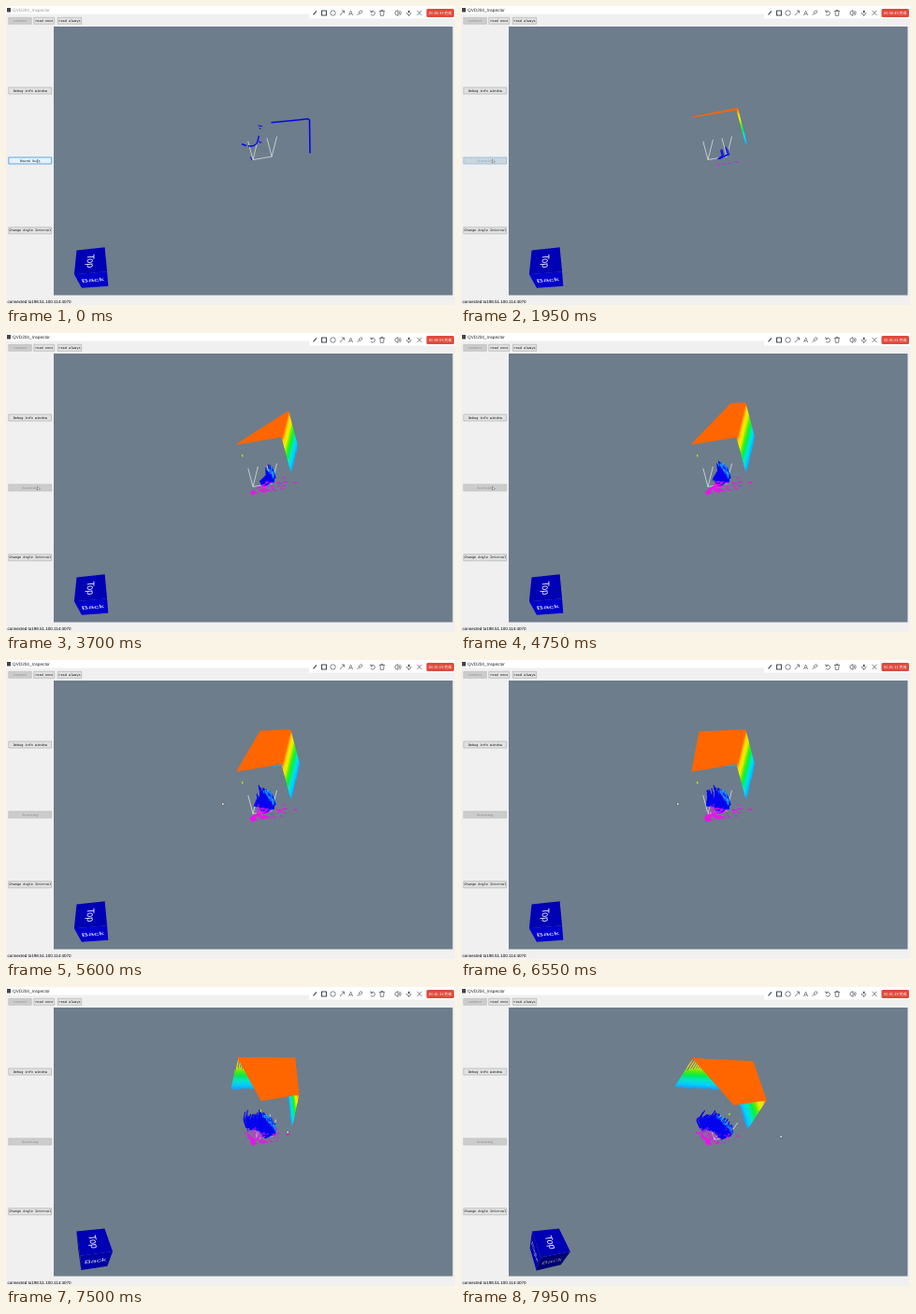
These frames come from a looping animation (480 by 320 pixels, 8000 ms). An HTML page with a canvas:

```html
<!DOCTYPE html>
<html lang="en">
<head>
<meta charset="utf-8">
<title>Range scan</title>
<style>
html, body { margin: 0; width: 480px; height: 320px; overflow: hidden; background: #f0f0f0; }
canvas { display: block; }
</style>
</head>
<body>
<canvas id="stage" width="480" height="320"></canvas>
<script>
const ctx = document.getElementById('stage').getContext('2d');
const LOOP = 8000, SCAN_START = 1800, TURN_START = 6900, TURN_TIME = 1050;
const RAD = Math.PI / 180;
const SCAN_RATE = 0.0196 * RAD, SCAN_STEP = 0.8 * RAD;
const MONO = '3.55px "Liberation Mono", monospace';
const SANS = '"Liberation Sans", Arial, sans-serif';
const BLUE = '#0606ee', ORANGE = '#ff6600', MAGENTA = '#f010f0';

const mix = (a, b, k) => a + (b - a) * k;
const clamp = v => Math.min(1, Math.max(0, v));
const turnAt = t => clamp((t - TURN_START) / TURN_TIME);

function random(seed) {
  return () => (seed = (seed * 16807) % 2147483647) / 2147483647;
}

function rect(x, y, w, h, fill) {
  ctx.fillStyle = fill;
  ctx.fillRect(x, y, w, h);
}

function trace(points, closed) {
  ctx.beginPath();
  for (const [x, y] of points) ctx.lineTo(x, y);
  if (closed) ctx.closePath();
}

function line(points, color, width = 1) {
  trace(points);
  ctx.strokeStyle = color;
  ctx.lineWidth = width;
  ctx.stroke();
}

function polygon(points, fill, edge, width = 0.8) {
  trace(points, true);
  ctx.fillStyle = fill;
  ctx.fill();
  if (edge) {
    ctx.strokeStyle = edge;
    ctx.lineWidth = width;
    ctx.stroke();
  }
}

function arc(x, y, r, color, from = 0, to = 2 * Math.PI) {
  ctx.beginPath();
  ctx.arc(x, y, r, from, to);
  ctx.strokeStyle = color;
  ctx.lineWidth = 0.7;
  ctx.stroke();
}

function label(text, x, y, font, color = '#000', align = 'left') {
  ctx.font = font;
  ctx.fillStyle = color;
  ctx.textAlign = align;
  ctx.textBaseline = 'middle';
  ctx.fillText(text, x, y);
}

function button(text, x, y, w, state = 'normal') {
  const [fill, edge, color] = {
    normal: ['#e1e1e1', '#adadad', '#000'],
    disabled: ['#cccccc', '#bfbfbf', '#858585'],
    hover: ['#e5f1fb', '#0078d7', '#000'],
    leaving: ['#cbd6df', '#3c8fce', '#7f9fb8']
  }[state];
  rect(x, y, w, 7.6, fill);
  ctx.strokeStyle = edge;
  ctx.lineWidth = 0.6;
  if (state === 'leaving') ctx.setLineDash([1, 1]);
  ctx.strokeRect(x + 0.3, y + 0.3, w - 0.6, 7);
  ctx.setLineDash([]);
  label(text, x + w / 2, y + 4, MONO, color, 'center');
}

function toolbar(t) {
  const ink = '#484c55', stroke = (...points) => line(points, ink, 0.7);
  rect(324, 0, 156, 13.5, '#fff');
  line([[328.5, 9.4], [332, 5.4]], ink, 1.2);
  ctx.strokeRect(337.5, 5, 5, 5);
  ctx.lineWidth = 0.7;
  arc(349.5, 7.5, 2.7, ink);
  stroke([357, 10], [361.5, 5]);
  stroke([358.8, 5], [361.5, 5], [361.5, 7.8]);
  label('A', 368.5, 7.6, '7px ' + SANS, ink, 'center');
  stroke([375.5, 10], [378, 7.5]);
  polygon([[377, 7], [379.5, 4.5], [381, 6], [378.5, 8.5]], '#fff', ink, 0.7);
  arc(392, 7.7, 2.4, ink, -2.4, 2.6);
  stroke([389.8, 4.4], [390, 6.6], [392, 6.4]);
  stroke([399, 5.5], [405, 5.5]);
  stroke([401, 5], [401, 4.4], [403, 4.4], [403, 5]);
  stroke([400, 5.5], [400.3, 10.3], [403.7, 10.3], [404, 5.5]);
  polygon([[416, 6.3], [419, 4.6], [419, 10.4], [416, 8.7]], '#fff', ink, 0.7);
  for (const r of [1.6, 3.1]) arc(419, 7.5, r, ink, -1, 1);
  line([[430.7, 4.8], [430.7, 7.3]], ink, 1.8);
  arc(430.7, 7, 2.4, ink, 0, Math.PI);
  stroke([430.7, 9.4], [430.7, 11]);
  stroke([439.5, 4.8], [444.5, 10]);
  stroke([444.5, 4.8], [439.5, 10]);

  ctx.beginPath();
  ctx.roundRect(449.5, 3, 29.5, 9, 1.5);
  ctx.fillStyle = '#e04a3c';
  ctx.fill();
  const s = Math.floor(35 + t * 0.0055), two = n => String(n).padStart(2, '0');
  label(`00:${two(Math.floor(s / 60))}:${two(s % 60)} 完成`, 464.3, 7.6,
    '4px "Noto Sans CJK SC", "Noto Sans CJK JP", sans-serif', '#fff', 'center');
}

function panel(t) {
  rect(0, 0, 480, 320, '#f0f0f0');
  rect(0, 0, 480, 8.5, '#fff');
  rect(1, 2, 4, 4.5, '#444');
  label('QVD204_Inspector', 7, 4.3, '4.7px ' + SANS, t < SCAN_START ? '#999' : '#222');
  button('connect', 2.5, 12, 25, 'disabled');
  button('read once', 29.5, 12, 22.5);
  button('read always', 55, 12, 26);
  button('Debug info window', 2.5, 86.8, 46.5);
  if (t < SCAN_START) button('Round Scan', 2.5, 161.7, 46.5, 'hover');
  else button('Scanning', 2.5, 161.7, 46.5, t < 2600 ? 'leaving' : 'disabled');
  button('Change Angle Interval', 2.5, 236.5, 46.5);
  label('connected to198.51.100.114:4070', 1.5, 317, '4.5px ' + SANS);
  toolbar(t);
  rect(51, 22, 426.5, 287.5, '#6d7d8b');
}

// Room space: origin on the ceiling above the scanner, u to the side wall,
// v to the far wall, h downwards. The view turn blends the three screen axes.
function roomView(t) {
  const k = turnAt(t);
  const ox = mix(247, 292, k), oy = mix(119, 126, k * k);
  const ux = mix(48, 34, k), uy = mix(-8, -5, k);
  const vx = mix(9, -14, k), vy = mix(-36, -41, k);
  const hx = mix(10, -20, k), hy = mix(38, 31, k);
  return (u, v, h) => [ox + u * ux + v * vx + h * hx, oy + u * uy + v * vy + h * hy];
}

// Distance from the scanner to the walls: side wall at u = 1, slanted far wall behind it.
function wallDistance(a) {
  return Math.min(1 / Math.max(Math.cos(a), 0.01), 1.17 / (Math.sin(a) + 0.17 * Math.cos(a)));
}

function axes(at) {
  for (const u of [0.1, 0.52]) {
    const base = at(u, 0, 1.22);
    line([base, at(u, 0, 0.7)], '#d9dee2', 0.8);
    line([base, at(u, 0.6, 1.22)], '#d9dee2', 0.8);
  }
  line([at(0.1, 0, 1.22), at(0.52, 0, 1.22)], '#d9dee2', 0.8);
}

function liveProfile(t) {
  const rnd = random(Math.floor(t / 50) + 11), j = () => (rnd() - 0.5) * 0.5;
  line([[283.5, 125 + j()], [312, 122 + j()], [323, 120.8], [324.5, 122], [325, 157.5]], BLUE, 1.6);
  line([[252, 147.8 + j()], [257, 149.5]], BLUE, 1.6);
  line([[259, 150], [264, 150 + j()], [268, 147.5], [270.5, 139]], BLUE, 1.3);
  line([[269.5, 128], [274, 128.5 + j()]], BLUE);
  line([[271, 130], [272, 132]], BLUE);
  line([[270, 144], [271, 146], [273.5, 146]], BLUE);
  line([[261.5, 161.5], [263, 165]], BLUE);
}

function wallPaint([x0, y0], [x1, y1]) {
  const g = ctx.createLinearGradient(x0, y0, x1, y1);
  [ORANGE, '#ffd800', '#e8f000', '#58f000', '#00f050', '#00e8c8', '#00d0ff', '#10a0ff']
    .forEach((c, i) => g.addColorStop(i / 7, c));
  return g;
}

// One entry per scanner direction reached so far, each with its own fixed noise.
function sweep(t) {
  const rnd = random(4711), end = (t - SCAN_START) * SCAN_RATE, columns = [];
  for (let a = 0; a < end; a += SCAN_STEP)
    columns.push({ a, i: columns.length, n: [rnd(), rnd(), rnd(), rnd()] });
  return columns;
}

function scan(t, at) {
  const columns = sweep(t);
  const ray = (a, r, h) => at(r * Math.cos(a), r * Math.sin(a), h);
  const edge = columns.map(({ a }) => ray(a, wallDistance(a), 0));

  for (const { a, i, n } of [...columns].reverse()) {
    const r = wallDistance(a), top = ray(a, r, 0), foot = ray(a, r, 0.92 + 0.1 * n[0]);
    const sparse = a > 70 * RAD && i % 3;
    line([sparse ? ray(a, r, 0.3 + 0.1 * n[1]) : top, foot], wallPaint(top, ray(a, r, 1)), 1.1);
  }
  polygon([at(0, 0, 0), ...edge], ORANGE, ORANGE, 1.2);

  // Things near the scanner: blue fittings, cyan tops, magenta floor.
  for (const { a, n } of columns) {
    if (a > 70 * RAD && n[3] < 0.3) continue;
    const r = 0.42 + 0.18 * n[0];
    line([ray(a, 0.26 + 0.14 * n[1], 1.25), ray(a, r, 1.18), ray(a, r, 1.16 - 0.22 * n[2])], BLUE, 1.1);
  }
  for (const { a, n } of columns) {
    const r = n[1] * (a < 25 * RAD ? 0.75 : 0.38);
    line([ray(a, r, 1.33 + 0.1 * n[2]), ray(a, r + 0.07, 1.36 + 0.1 * n[2])], MAGENTA, 1);
    if (a < 60 * RAD && n[3] < 0.6)
      line([ray(a, 0.5 + 0.1 * n[2], 1.1), ray(a, 0.5 + 0.1 * n[2], 1 + 0.1 * n[0])], '#18b0ff', 0.8);
  }
  if (columns.length > 20) {
    line([at(0.05, 0, 0.3), at(0.05, 0, 0.37)], '#a8e800', 1.4);
    line([at(0.94, 0.12, 1.4), at(1.02, 0.12, 1.4)], MAGENTA, 1.4);
  }
}

// Perspective view of the orientation cube, looked at from 55 degrees above.
function cubeView(yaw, roll) {
  const s = Math.sin(55 * RAD), c = Math.cos(55 * RAD);
  return ([x, y, z]) => {
    const px = x * Math.cos(yaw) - y * Math.sin(yaw), py = x * Math.sin(yaw) + y * Math.cos(yaw);
    const up = py * s + z * c, scale = 118 / (8 + py * c - z * s);
    return [92.7 + scale * (px * Math.cos(roll) - up * Math.sin(roll)),
      281 - scale * (px * Math.sin(roll) + up * Math.cos(roll))];
  };
}

// Each face: name, normal, direction of its text, downward direction of its text.
const FACES = [
  ['Left', [1, 0, 0], [0, 1, 0], [0, 0, -1]],
  ['Right', [-1, 0, 0], [0, -1, 0], [0, 0, -1]],
  ['Back', [0, -1, 0], [1, 0, 0], [0, 0, -1]],
  ['Top', [0, 0, 1], [0, -1, 0], [-1, 0, 0]]
];

function cube(t) {
  const k = turnAt(t), yaw = mix(-12, 36, k) * RAD, roll = mix(15, -21, k) * RAD;
  const view = cubeView(yaw, roll), lamp = yaw + 20 * RAD;
  for (const [name, n, a, b] of FACES) {
    const corner = (i, j) => view(n.map((v, m) => v + i * a[m] + j * b[m]));
    const quad = [corner(-1, -1), corner(1, -1), corner(1, 1), corner(-1, 1)];
    const [[x0, y0], [x1, y1], [x2, y2], [x3, y3]] = quad;
    if ((x2 - x0) * (y3 - y1) < (y2 - y0) * (x3 - x1)) continue;
    const light = n[2] ? 0.88 : clamp(-n[1] * Math.cos(lamp) - n[0] * Math.sin(lamp));
    polygon(quad, `rgb(0,0,${Math.round(205 * light)})`);
    const grey = Math.round(255 * (n[2] ? 1 : light));
    ctx.save();
    ctx.transform((x1 + x2 - x0 - x3) / 200, (y1 + y2 - y0 - y3) / 200,
      (x3 + x2 - x0 - x1) / 200, (y3 + y2 - y0 - y1) / 200,
      (x0 + x1 + x2 + x3) / 4, (y0 + y1 + y2 + y3) / 4);
    label(name, 0, 2, '34px ' + SANS, `rgb(${grey},${grey},${grey})`, 'center');
    ctx.restore();
  }
}

// The pointer dips on its way into the view, rests, then drags steadily right.
function cursor(t) {
  const k = clamp((t - 4800) / 400), drag = Math.max(0, t - 6740) * 0.091;
  const x = mix(33.5, 231, k) + drag;
  const y = mix(164, 152, k) + 65 * Math.sin(Math.PI * k) + 6 * turnAt(t) ** 3;
  polygon([[x, y], [x, y + 4], [x + 1.2, y + 3], [x + 2.9, y + 2.9]], '#fff', '#333', 0.4);
}

function draw(t) {
  ctx.textRendering = 'geometricPrecision';
  ctx.lineJoin = 'round';
  const at = roomView(t);
  panel(t);
  axes(at);
  if (t < SCAN_START) liveProfile(t);
  else scan(t, at);
  cube(t);
  cursor(t);
}

const start = performance.now();
function frame() {
  draw((performance.now() - start) % LOOP);
  requestAnimationFrame(frame);
}
frame();
</script>
</body>
</html>
```
